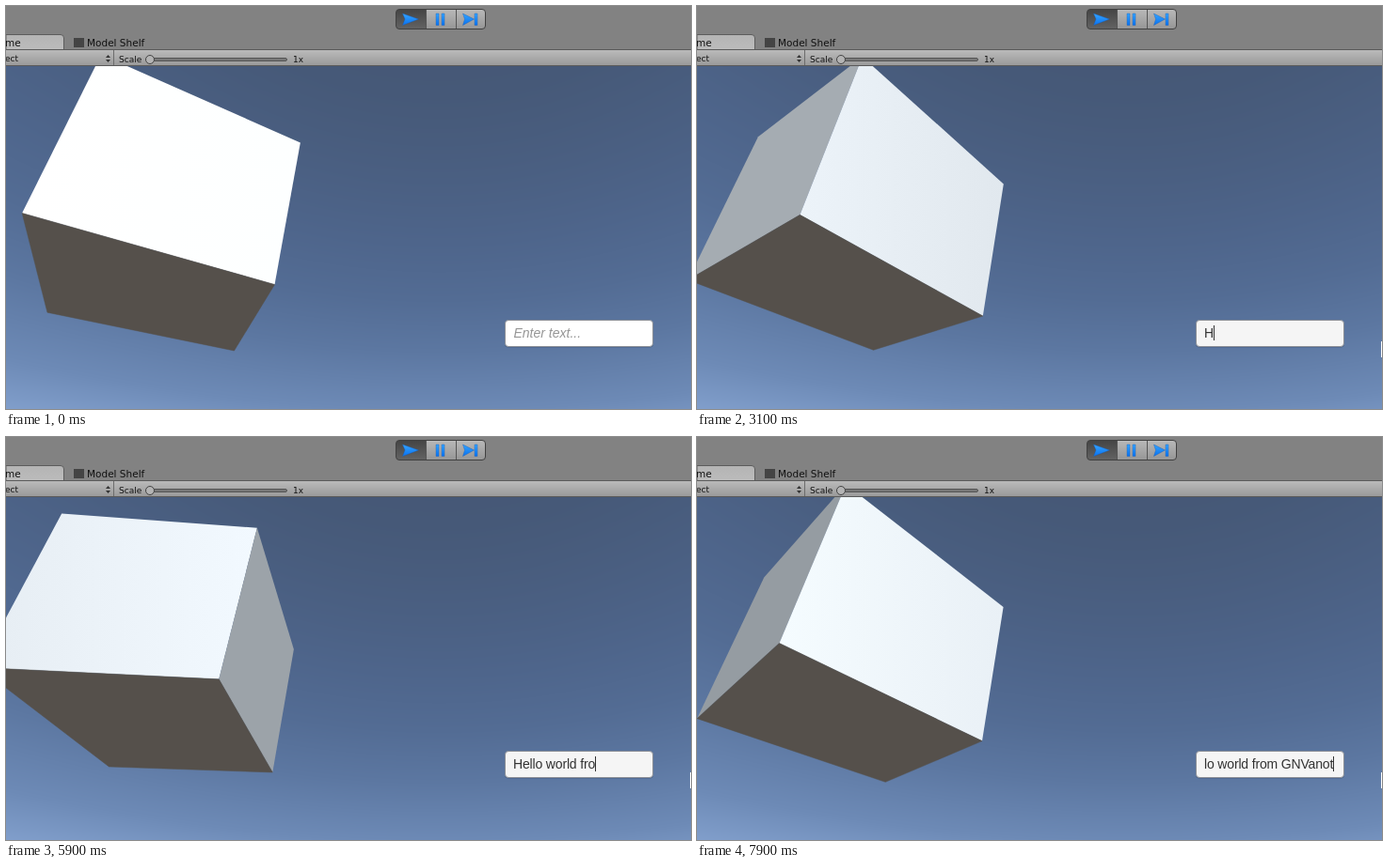
Recreate the animation shown at these times as an HTML page with a canvas. Size 728x429 px, loop 8000 ms.

```html
<!DOCTYPE html>
<html lang="en">
<head>
<meta charset="utf-8">
<title>Spinning cube</title>
<style>
html, body { margin: 0; width: 728px; height: 429px; overflow: hidden; background: #828282; }
canvas { position: absolute; left: 0; top: 64px; }
svg { position: absolute; left: 0; top: 0; }
text { white-space: pre; }
.ui { font-family: "DejaVu Sans", sans-serif; fill: #111; }
.tab { font-size: 10.5px; }
.small { font-size: 9px; }
#hint { font: italic 14px "Liberation Sans", Arial, sans-serif; fill: #969696; }
#typed { font: 14px "Liberation Sans", Arial, sans-serif; letter-spacing: -.16px; fill: #323232; }
</style>
</head>
<body>
<canvas id="sky" width="728" height="365"></canvas>
<svg width="728" height="429" viewBox="0 0 728 429">
  <defs>
    <linearGradient id="bar" x2="0" y2="1"><stop stop-color="#bababa"/><stop offset="1" stop-color="#989898"/></linearGradient>
    <linearGradient id="tab" x2="0" y2="1"><stop stop-color="#b4b4b4"/><stop offset="1" stop-color="#bcbcbc"/></linearGradient>
    <linearGradient id="btn" x2="0" y2="1"><stop stop-color="#b9b9b9"/><stop offset="1" stop-color="#959595"/></linearGradient>
    <linearGradient id="down" x2="0" y2="1"><stop stop-color="#444"/><stop offset="1" stop-color="#636363"/></linearGradient>
    <linearGradient id="blue" x2="0" y2="1"><stop stop-color="#35a5ff"/><stop offset="1" stop-color="#0a72f0"/></linearGradient>
  </defs>

  <g id="cube" stroke-width=".5" stroke-linejoin="round"></g>

  <g id="chrome">
    <rect width="728" height="64" fill="#828282"/>
    <path d="M0 30.5H58Q61.5 30.5 61.5 34V47H0Z" fill="url(#tab)" stroke="#5c5c5c"/>
    <rect y="47" width="728" height="17" fill="url(#bar)"/>
    <path d="M0 46.5H728M0 63.5H728" stroke="#5a5a5a"/>
    <path d="M114.5 47V63" stroke="#6c6c6c"/>
    <text class="ui tab" x="-1" y="43">me</text>
    <rect x="72" y="34" width="11" height="10" fill="#444"/>
    <text class="ui tab" x="86" y="43">Model Shelf</text>
    <text class="ui small" x="-1" y="59">ect</text>
    <path d="M106 55L108.5 52L111 55ZM106 57L108.5 60L111 57Z" fill="#333"/>
    <text class="ui small" x="120" y="60">Scale</text>
    <rect x="152.500" y="55.500" width="146" height="3" rx="1.500" fill="#777" stroke="#555"/>
    <circle cx="153" cy="57" r="4.500" fill="#b4b4b4" stroke="#444"/>
    <text class="ui small" x="305" y="60">1x</text>
    <rect x="414.500" y="3.500" width="95" height="21" rx="3.500" fill="url(#btn)"/>
    <path d="M446 3.500H418Q414.500 3.500 414.500 7V21Q414.500 24.500 418 24.500H446Z" fill="url(#down)"/>
    <path d="M446.500 4V24M478.500 4V24" stroke="#555"/>
    <rect x="414.500" y="3.500" width="95" height="21" rx="3.500" fill="none" stroke="#404040"/>
    <g fill="url(#blue)" stroke="#1a5cb4" stroke-width=".4">
      <path d="M421.500 8L438.500 14L421.500 20.500L424 14Z"/>
      <path d="M457 8H460V20.500H457ZM463 8H466V20.500H463Z"/>
      <path d="M485.500 8L497.500 14L485.500 20.500L487.500 14ZM498 8H501V20.500H498Z"/>
    </g>
  </g>

  <g id="field">
    <rect x="530" y="335" width="158" height="28.500" rx="4" fill="#34496e" opacity=".55"/>
    <rect id="box" x="530.500" y="334.500" width="157" height="28" rx="3.500" stroke="#8b8f97"/>
    <text id="hint" x="539.500" y="353">Enter text...</text>
    <text id="typed" x="539" y="353"></text>
    <rect id="caret" y="340" width="1" height="16" fill="#323232"/>
  </g>
  <path id="arrow" d="M0 0L-12.500 3.500L-9 6.500L-14.500 12.500L-12.500 14.500L-6.500 9L-3.500 12.500Z" stroke="#fff" stroke-width="1.600" paint-order="stroke"/>
  <rect id="edge" x="727" y="357" width="1" height="17" fill="#fff"/>
</svg>
<script>
const $ = id => document.getElementById(id);
const rad = Math.PI / 180;

// Camera: pinhole pitched upwards
const CX = 460, CY = 349, F = 490;
const cosP = Math.cos(25.7 * rad), sinP = Math.sin(25.7 * rad);

function project([x, y, z]) {
  const depth = z * cosP + y * sinP;
  return [CX + F * x / depth, CY - F * (y * cosP - z * sinP) / depth];
}

// Sky colour by sine of elevation
const ramp = [
  [.18, 136, 166, 211], [.28, 109, 138, 182], [.4, 92, 119, 161],
  [.5, 83, 108, 148], [.6, 78, 101, 139], [.8, 70, 89, 120], [1, 66, 82, 110]
];

function paintSky() {
  const ctx = $('sky').getContext('2d');
  const img = ctx.createImageData(728, 365);
  for (let y = 0, p = 0; y < 365; y++) {
    const dy = CY - y - 64;
    const up = dy * cosP + F * sinP;
    for (let x = 0; x < 728; x++, p += 4) {
      const e = up / Math.hypot(x - CX, dy, F);
      let i = 0;
      while (i < ramp.length - 2 && e > ramp[i + 1][0]) i++;
      const a = ramp[i], b = ramp[i + 1];
      const k = Math.max(0, (e - a[0]) / (b[0] - a[0]));
      for (let c = 0; c < 3; c++) img.data[p + c] = a[c + 1] + (b[c + 1] - a[c + 1]) * k;
      img.data[p + 3] = 255;
    }
  }
  ctx.putImageData(img, 0, 0);
}

// Cube: four sides and the underside
const SIDE = .806, MID_X = -1.2285, MID_Z = 1.732;
const NS = 'http://www.w3.org/2000/svg';

function add(parent, tag, attrs = {}) {
  const el = document.createElementNS(NS, tag);
  for (const k in attrs) el.setAttribute(k, attrs[k]);
  return parent.appendChild(el);
}

const sides = [0, 1, 2, 3].map(i => {
  const grad = add($('cube'), 'linearGradient', { id: 'side' + i });
  const stops = [0, 1].map(offset => add(grad, 'stop', { offset }));
  return { stops, face: add($('cube'), 'polygon', { fill: `url(#side${i})` }) };
});
const under = add($('cube'), 'polygon', { fill: '#55504b', stroke: '#55504b' });

const tint = c => `rgb(${[-6, 1, 7].map(d => Math.min(255, Math.round(c + d)))})`;

function drawCube(t) {
  const turn = 32.8 - t * .02;
  const ring = y => [0, 1, 2, 3].map(i => {
    const a = (turn + 225 + 90 * i) * rad, r = SIDE / Math.SQRT2;
    return project([MID_X + r * Math.cos(a), y, MID_Z + r * Math.sin(a)]);
  });
  const low = ring(1), high = ring(1 + SIDE);
  under.setAttribute('points', low.join(' '));

  sides.forEach(({ stops, face }, i) => {
    const j = (i + 1) % 4;
    const [a, b, c] = [low[i], low[j], high[j]];
    const facing = (b[0] - a[0]) * (c[1] - b[1]) - (b[1] - a[1]) * (c[0] - b[0]) < 0;
    face.style.display = facing ? '' : 'none';
    if (!facing) return;
    face.setAttribute('points', [a, b, c, high[i]].join(' '));
    const turned = (turn + 90 * i - 31) % 360;
    const off = turned < -180 ? turned + 360 : turned;
    const light = 84 + 176 * Math.max(0, Math.cos(off * rad));
    const sheen = Math.abs(off) < 45 ? 6 * Math.sin(4 * off * rad) : 0;
    stops[0].setAttribute('stop-color', tint(light + sheen));
    stops[1].setAttribute('stop-color', tint(light - sheen));
  });
}

// Typing
const phrase = 'Hello world from GNVanot';
const keys = [
  3000, 3200, 3500, 3700, 4000, 4200, 4700, 4800, 4900, 5000, 5100, 5300,
  5500, 5800, 5900, 6000, 6200, 6400, 6600, 6900, 7100, 7200, 7300, 7600
];

// Shows the text, dropping leading letters that do not fit; returns its width
function showText(text) {
  const el = $('typed');
  el.textContent = text;
  while (el.getComputedTextLength() > 139.5) el.textContent = text = text.slice(1);
  return text ? el.getComputedTextLength() : 0;
}

function drawField(t) {
  const count = keys.filter(k => k <= t).length;
  const width = showText(phrase.slice(0, count));
  $('hint').style.display = count ? 'none' : '';
  $('box').setAttribute('fill', t < 900 ? '#fff' : '#f5f5f5');
  const since = t - (count ? keys[count - 1] : 1000);
  const on = since >= 0 && since % 1180 < 590;
  $('caret').style.display = on ? '' : 'none';
  $('caret').setAttribute('x', Math.round(539 + width));
}

// Pointer path: time, x, y
const path = [[600, 592, 383], [900, 566, 350], [1300, 566, 350], [1800, 742, 358]];

function drawPointer(t) {
  const i = path.findIndex((p, n) => n < 3 && t >= p[0] && t < path[n + 1][0]);
  $('arrow').style.display = i < 0 ? 'none' : '';
  $('edge').style.display = t < 1800 ? 'none' : '';
  if (i < 0) return;
  const [a, b] = [path[i], path[i + 1]];
  const k = (t - a[0]) / (b[0] - a[0]);
  $('arrow').setAttribute('transform', `translate(${a[1] + (b[1] - a[1]) * k} ${a[2] + (b[2] - a[2]) * k})`);
}

// The picture advances in 100 ms steps and stalls at times
const stalls = [4100, 4600, 5200, 5700, 6100, 6500, 7500];

function stepTime(ms) {
  const t = Math.floor(ms / 100) * 100;
  if (t > 2400 && t < 3000) return 2400;
  return stalls.includes(t) ? t - 100 : t;
}

let start, last;
function tick(now) {
  start ??= now;
  const t = stepTime((now - start) % 8000);
  if (t !== last) {
    drawCube(t);
    drawField(t);
    drawPointer(t);
    last = t;
  }
  requestAnimationFrame(tick);
}

paintSky();
requestAnimationFrame(tick);
</script>
</body>
</html>
```
